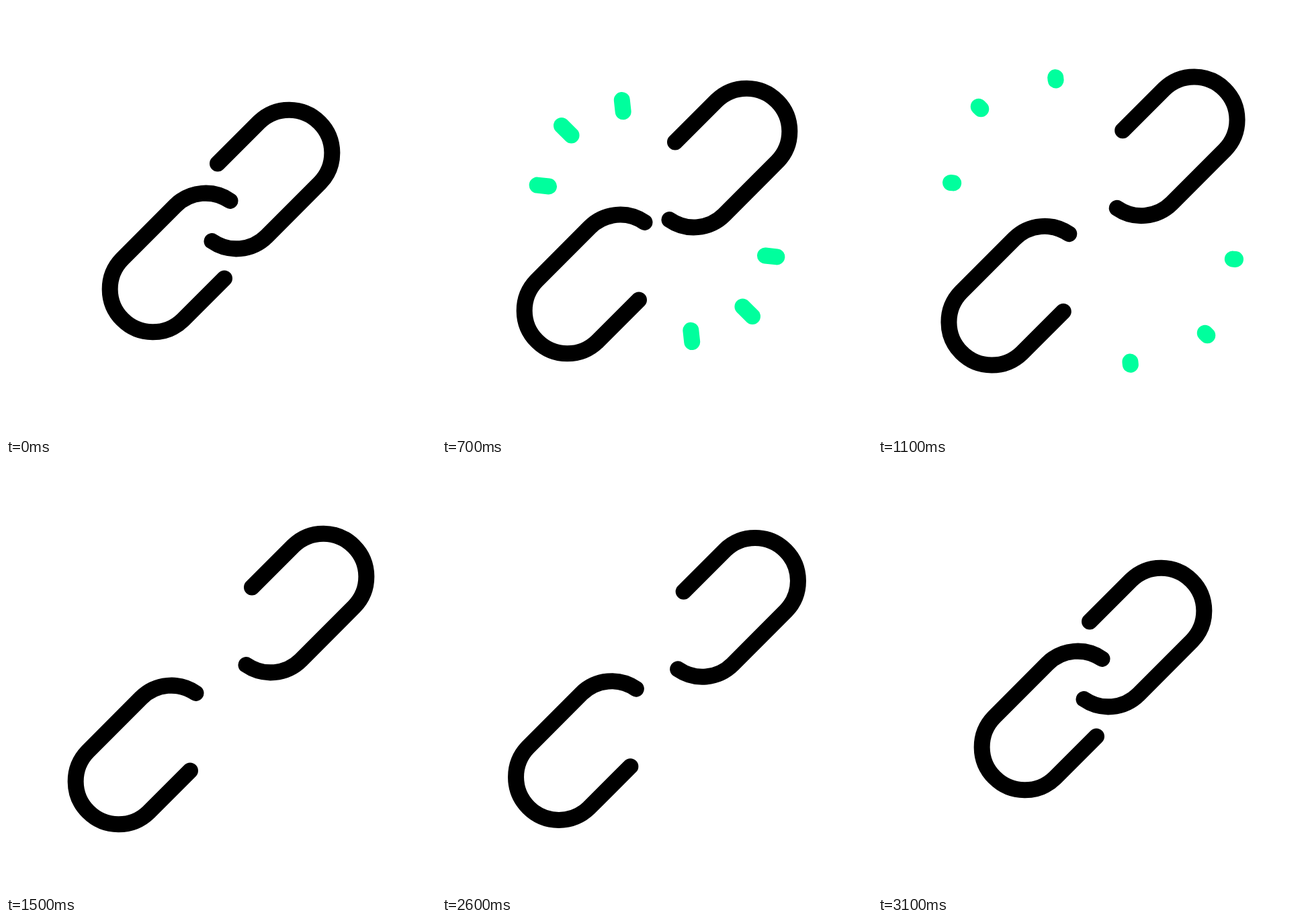
An HTML page that plays this animation: 640x640 px, repeating every 3600 ms.

```html
<!DOCTYPE html>
<html lang="en">
<head>
<meta charset="utf-8">
<title>Breaking link</title>
<style>
  html, body { margin: 0; height: 100%; overflow: hidden; background: #fff; }
  svg { display: block; width: 100%; height: 100%; }
  #half { fill: none; stroke-width: 24; stroke-linecap: round; }
</style>
</head>
<body>
<svg viewBox="0 0 640 640">
  <g id="half">
    <path id="link" stroke="#000"
      d="M315 234.5 376.75 172.75A64 64 0 0 1 467.25 263.25L388 342.75A64 64 0 0 1 306.5 350"/>
    <g id="sparks" stroke="#00ff9d"><line/><line/><line/></g>
  </g>
  <use href="#half" transform="rotate(180 320 320)"/>
</svg>
<script>
const LOOP = 3600, STEP = 100, GAP = 51;
const link = document.getElementById('link');
const sparks = document.getElementById('sparks');

// Each spark travels from its first point to its second.
const tracks = [
  [274.5, 202.5, 263.8, 102.8],
  [230.5, 230.5, 146.8, 146.8],
  [204.2, 273.4, 104.5, 262.6],
];

const progress = (t, start, length) => Math.min(1, Math.max(0, (t - start) / length));
const opening = t => 1 - (1 - progress(t, 414, 1020)) ** 3;
const closing = t => progress(t, 2100, 1000) ** 3;
const mix = (a, b, p) => a + (b - a) * p;

function draw(t) {
  const shift = GAP * (opening(t) - closing(t));
  link.setAttribute('transform', `translate(${shift} ${-shift})`);

  sparks.style.display = t >= 500 && t < 1500 ? '' : 'none';
  const head = opening(t), tail = opening(t - 100);
  tracks.forEach(([x1, y1, x2, y2], i) => {
    const ends = { x1: mix(x1, x2, tail), y1: mix(y1, y2, tail),
                   x2: mix(x1, x2, head), y2: mix(y1, y2, head) };
    for (const name in ends) sparks.children[i].setAttribute(name, ends[name]);
  });
}

// The motion advances ten times a second.
function tick() {
  draw(Math.floor(performance.now() % LOOP / STEP) * STEP);
  requestAnimationFrame(tick);
}
tick();
</script>
</body>
</html>
```
